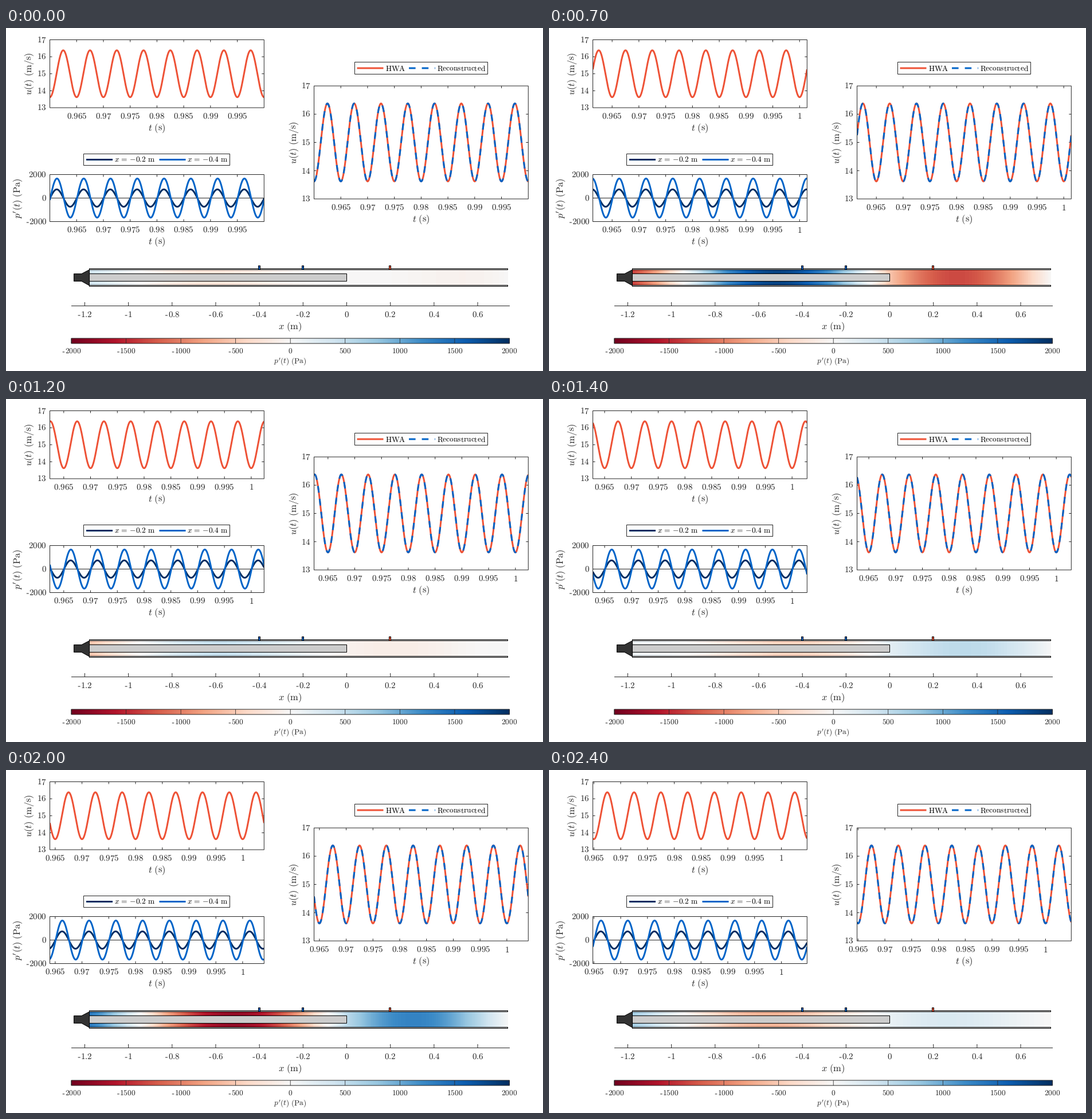
Animation, 937 px wide and 598 px high, one loop 2500 ms. Source, as a matplotlib script:

```python
import numpy as np
import matplotlib.pyplot as plt
from matplotlib.animation import FuncAnimation
from matplotlib.colors import LinearSegmentedColormap
from matplotlib.patches import Polygon, Rectangle

W, H, DPI = 937, 598, 64
PT = 72 / DPI  # points per pixel
FRAMES, STEP = 25, 0.0002
T0, SPAN, OMEGA = 0.96, 0.04, 2 * np.pi * 200
K = 3.66  # wavenumber, 1/m

INK = "#262626"
RED, BLUE, NAVY = "#ee5236", "#0064c8", "#002d62"
PRESSURE = LinearSegmentedColormap.from_list("pressure", [
    "#72001f", "#b2142b", "#d75f4c", "#f2a382", "#fcdac8", "#f7f7f7",
    "#d1e5f0", "#96c6e0", "#3c8bc7", "#0c5db0", "#022f60"], N=256)

plt.rcParams.update({"mathtext.fontset": "cm", "path.snap": False,
                     "text.hinting": "none"})
fig = plt.figure(figsize=(W / DPI, H / DPI), dpi=DPI, facecolor="white")
ax = fig.add_axes([0, 0, 1, 1])
ax.axis("off")


def line(x, y, color=INK, width=1, **kw):
    kw.setdefault("solid_capstyle", "butt")
    return ax.plot(x, y, color=color, lw=width * PT, **kw)[0]


def box(x0, y0, x1, y1, face="none", edge=INK, z=3):
    return ax.add_patch(Rectangle((x0, y0), x1 - x0, y1 - y0, fc=face,
                                  ec=edge, lw=PT, zorder=z))


def label(x, y, tex, size=16.5, color=INK, **kw):
    kw.setdefault("ha", "center")
    kw.setdefault("va", "baseline")
    return ax.text(x, y, f"${tex}$", size=size * PT, color=color, **kw)


def number(x, y, value, size=15, ha="center"):
    """Number centred on y, with a text hyphen for negative values."""
    base = y + 0.32 * size
    digits = f"{abs(value):g}"
    if value >= 0:
        return label(x, base, digits, size, ha=ha)
    dots = digits.count(".")
    width = (0.333 + 0.5 * (len(digits) - dots) + 0.278 * dots) * size
    left = x - width * (0.5 if ha == "center" else 1)
    line([left + 0.02 * size, left + 0.28 * size], [base - 0.215 * size] * 2)
    return label(left + 0.333 * size, base, digits, size, ha="left")


def segments(pairs):
    """Join (x0, y0, x1, y1) segments into one broken line."""
    xs, ys = [], []
    for x0, y0, x1, y1 in pairs:
        xs += [x0, x1, np.nan]
        ys += [y0, y1, np.nan]
    return xs, ys


class Scope:
    """Plot with a scrolling time window."""
    ticks = np.arange(0.965, 1.0001, 0.005)

    def __init__(self, x0, y0, x1, y1, lo, hi, yticks):
        self.x0, self.y0, self.x1, self.y1 = x0, y0, x1, y1
        self.lo, self.hi = lo, hi
        self.curves = []
        self.clip = box(x0, y0, x1, y1)
        for v in yticks:
            y = self.to_y(v)
            number(x0 - 6, y, v, ha="right")
            if lo < v < hi:
                line(*segments([(x0, y, x0 + 4, y), (x1 - 4, y, x1, y)]))
        label((x0 + x1) / 2, y1 + 39.5, r"t\ \mathrm{(s)}")
        self.marks = line([], [])
        self.names = [number(0, y1 + 14.7, round(t, 3)) for t in self.ticks]

    def to_y(self, v):
        return self.y1 + (v - self.lo) / (self.hi - self.lo) * (self.y0 - self.y1)

    def add(self, func, color, **kw):
        curve = line([], [], color, 3, solid_joinstyle="round",
                     dash_joinstyle="round", zorder=2, **kw)
        curve.set_clip_path(self.clip)
        self.curves.append((curve, func))

    def update(self, start):
        t = np.linspace(start, start + SPAN, 1200)
        x = np.linspace(self.x0, self.x1, t.size)
        for curve, func in self.curves:
            curve.set_data(x, self.to_y(func(t)))
        marks = []
        for tick, name in zip(self.ticks, self.names):
            frac = (tick - start) / SPAN
            shown = 1e-6 < frac < 1 - 1e-6
            name.set_visible(shown)
            if shown:
                px = self.x0 + frac * (self.x1 - self.x0)
                name.set_x(px)
                marks += [(px, self.y1, px, self.y1 - 4),
                          (px, self.y0, px, self.y0 + 4)]
        self.marks.set_data(*segments(marks))


def velocity(t):
    return 15 - 1.38 * np.cos(OMEGA * t)


def pressure(x, t):
    """Standing wave in annulus (x < 0) and open duct, with a slow phase drift."""
    shape = np.where(x < 0, 1820 * np.cos(K * (x + 0.515)),
                     -1340 * np.sin(K * (0.74 - x)))
    lag = np.where(x < 0, -0.25 * x, -0.3 * x * x)
    return shape * np.sin(OMEGA * t - lag)


def legend_box(x0, y0, x1, y1, entries):
    box(x0, y0, x1, y1, "white")
    y = (y0 + y1) / 2
    for x, color, tex, style in entries:
        line([x, x + 46], [y, y], color, 3, zorder=4, **style)
        label(x + 49, y + 4.3, tex, 13.4, "black", ha="left", zorder=4)


# Time plots
wire = Scope(76.5, 20.5, 450.3, 139, 13, 17, range(13, 18))
wire.add(velocity, RED)
label(41, 80, r"u(t)\ \mathrm{(m/s)}", rotation=90, va="center")

mics = Scope(76.5, 255.5, 450.3, 337.5, -2000, 2000, (-2000, 0, 2000))
line([76.5, 450.3], [296.5, 296.5], zorder=1.5)
mics.add(lambda t: pressure(-0.2, t), NAVY)
mics.add(lambda t: pressure(-0.4, t), BLUE)
label(21, 297, r"p'(t)\ \mathrm{(Pa)}", rotation=90, va="center")

both = Scope(537.5, 101, 911.3, 298, 13, 17, range(13, 18))
DASH = dict(dashes=(11.6 / 3, 11 / 3), dash_capstyle="butt")
both.add(velocity, RED)
both.add(velocity, BLUE, **DASH)
label(503, 200, r"u(t)\ \mathrm{(m/s)}", rotation=90, va="center")
scopes = (wire, mics, both)

legend_box(135.5, 219.5, 390.5, 239.5, [
    (140, NAVY, r"x\,=\,{-}0.2\ \mathrm{m}", {}),
    (267.5, BLUE, r"x\,=\,{-}0.4\ \mathrm{m}", {})])
legend_box(608.5, 59.5, 840.5, 80.5, [
    (612.5, RED, r"\mathrm{HWA}", {}),
    (703, BLUE, r"\mathrm{Reconstructed}", DASH)])

# Duct
ORIGIN, SCALE = 594.5, 380.9
cols = (np.arange(145, 876) + 0.5 - ORIGIN) / SCALE
field = ax.imshow(np.zeros((1, cols.size)), cmap=PRESSURE, vmin=-2000,
                  vmax=2000, extent=(145, 876, 449, 421), aspect="auto",
                  interpolation="nearest")
box(145.5, 419.5, 875.5, 421.5, "#cccccc", "black")
box(145.5, 448.5, 875.5, 450.5, "#cccccc", "black")
box(145.5, 428.5, 594.5, 441.5, "#cccccc", "black")
ax.add_patch(Polygon([(118.5, 428.5), (132, 428.5), (145.5, 421.5),
                      (145.5, 449), (132, 441.5), (118.5, 441.5)],
                     fc="#333333", ec="black", lw=PT, zorder=4))
for pos, color in ((-0.4, BLUE), (-0.2, BLUE), (0.2, RED)):
    px = round(ORIGIN + SCALE * pos - 0.5)
    box(px - 1.5, 414.5, px + 1.5, 421.5, color, "black", 4)

line([114, 879], [484.5, 484.5])
for v in np.arange(-6, 4) / 5:
    px = ORIGIN + SCALE * v
    line([px, px], [484.5, 478])
    number(px, 499.5, v)
label(496, 525, r"x\ \mathrm{(m)}")

# Colour bar
ax.imshow(np.linspace(0, 1, 256)[None], cmap=PRESSURE, aspect="auto",
          extent=(114, 878.5, 550, 541), interpolation="nearest")
box(114, 541, 878.5, 550)
for v in range(-2000, 2001, 500):
    px = 496.2 + 382.2 * v / 2000
    line([px, px], [541, 550], width=0.8)
    number(px, 563.5, v, 13.4)
label(496, 585, r"p'(t)\ \mathrm{(Pa)}", 13.4)

ax.set_xlim(0, W)
ax.set_ylim(H, 0)


def update(i):
    start = T0 + i * STEP
    for scope in scopes:
        scope.update(start)
    field.set_data(pressure(cols, start)[None])
    return []


anim = FuncAnimation(fig, update, frames=FRAMES, init_func=lambda: update(0),
                     interval=100, repeat=True, repeat_delay=0)
plt.show()
```
